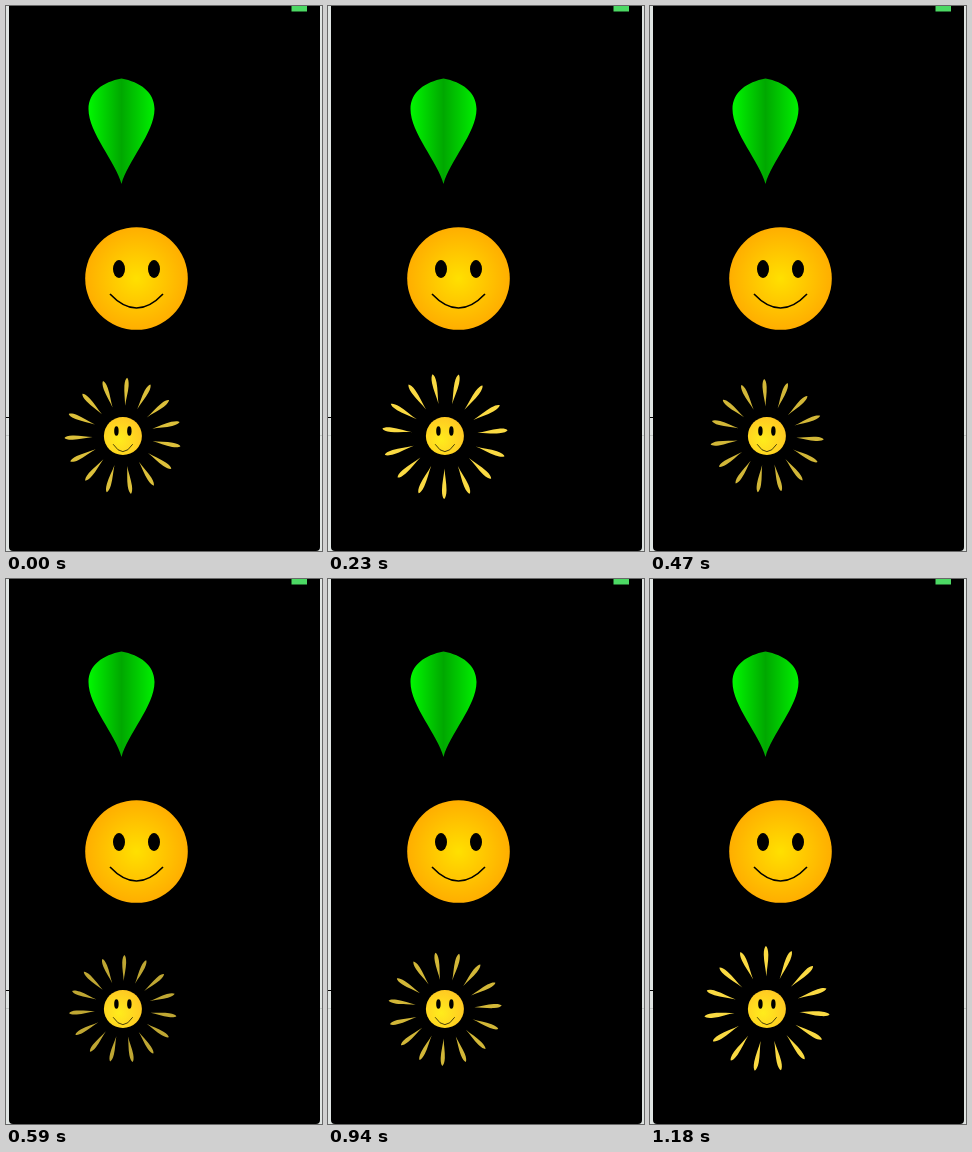
These frames come from a looping animation (316 px wide and 545 px high, 1.28 s). An HTML page:

```html
<!DOCTYPE html>
<html lang="en">
<head>
<meta charset="utf-8">
<title>Leaf, smiley and sun</title>
<style>
  html, body { margin: 0; width: 100%; height: 100%; overflow: hidden; background: #dfe4e2; }
  svg { display: block; width: 100%; height: 100%; }
</style>
</head>
<body>
<svg viewBox="0 0 316 545">
  <defs>
    <linearGradient id="green">
      <stop offset="0" stop-color="#00f800"/>
      <stop offset=".5" stop-color="#00a800"/>
      <stop offset="1" stop-color="#00f000"/>
    </linearGradient>
    <radialGradient id="gold">
      <stop offset="0" stop-color="#ffe000"/>
      <stop offset="1" stop-color="#ffae00"/>
    </radialGradient>
    <radialGradient id="sunny" cx=".4" cy=".6" r=".7">
      <stop offset="0" stop-color="#ffec1c"/>
      <stop offset="1" stop-color="#ffc423"/>
    </radialGradient>
    <!-- Pointed end at the origin, rounded end upwards -->
    <path id="leaf" d="M0-105.5C-18.5-102-33-92-33-75C-33-51-5.5-22 0 0C5.5-22 33-51 33-75C33-92 18.5-102 0-105.5Z"/>
    <g id="face">
      <ellipse cx="-17.5" cy="-9.5" rx="6" ry="9"/>
      <ellipse cx="17.5" cy="-9.5" rx="6" ry="9"/>
      <path d="M-26.5 15.5Q0 43.5 26.5 15.5" fill="none" stroke="#000" stroke-width="1.6"/>
    </g>
  </defs>

  <path d="M0 429.5H316" stroke="#c4c9c7"/>
  <path d="M0 411.5H3" stroke="#000"/>
  <path d="M3 0H314V541Q314 545 310 545H7Q3 545 3 541Z"/>
  <path d="M285.5 0H301V5.5H285.5Z" fill="#4cd964"/>

  <use href="#leaf" x="115.5" y="178" fill="url(#green)"/>

  <g transform="translate(130.5 272.5)">
    <circle r="51.3" fill="url(#gold)"/>
    <use href="#face"/>
  </g>

  <g transform="translate(116.9 430)">
    <g id="rays" fill="#ffdf45"></g>
    <circle r="19" fill="url(#sunny)"/>
    <use href="#face" transform="scale(.37 .53)"/>
  </g>
</svg>
<script>
const LOOP = 1280;
const STEPS = [120, 230, 350, 470, 590, 710, 820, 940, 1060, 1180];
const COUNT = 15;
const HALF = 4.25;   // steps from largest to smallest
const PEAK = 1.75;   // step position of the first largest size
const rays = document.getElementById('rays');

for (let i = 0; i < COUNT; i++) {
  const ray = document.createElementNS('http://www.w3.org/2000/svg', 'use');
  ray.setAttribute('href', '#leaf');
  ray.setAttribute('transform', `rotate(${i * 360 / COUNT}) translate(0 -33) scale(.07 .291)`);
  rays.append(ray);
}

const start = performance.now();

function draw() {
  const t = (performance.now() - start) % LOOP;
  const step = STEPS.filter(s => s <= t).length;
  // Triangle wave: 1 at the peak, 0 half a pulse later
  const phase = (step - PEAK + 2 * HALF) / HALF % 2;
  const size = Math.abs(1 - phase);
  rays.setAttribute('transform', `rotate(${4.1 + 4.3 * step}) scale(${0.8 + 0.2 * size})`);
  rays.setAttribute('opacity', 0.67 + 0.33 * size);
  requestAnimationFrame(draw);
}
draw();
</script>
</body>
</html>
```
